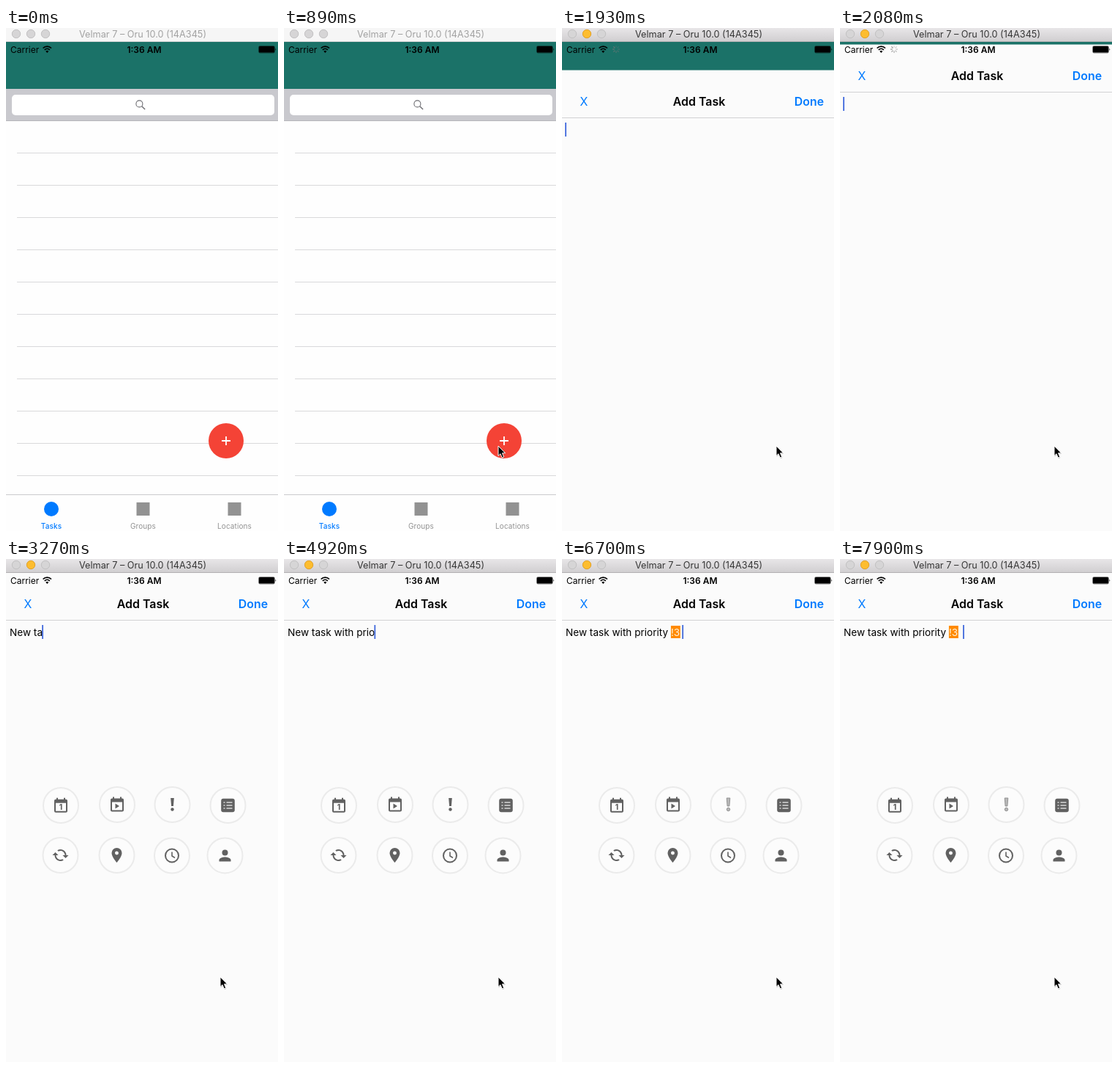
Recreate the animation shown at these times as an HTML page. Size 372 by 686 pixels, loop 8 s.

```html
<!DOCTYPE html>
<html lang="en">
<head>
<meta charset="utf-8">
<title>Add Task</title>
<style>
  html, body { margin: 0; width: 100%; height: 100%; overflow: hidden; background: #fff; }
  svg { display: block; width: 372px; height: 686px; font-family: Inter, Roboto, sans-serif; }
  .mid { text-anchor: middle; }
  .nav { font-size: 15.9px; }
  .bold { font-weight: 600; }
  .entry { font-size: 13.6px; white-space: pre; }
  .tab { font-size: 10px; letter-spacing: .1px; }
</style>
</head>
<body>
<svg viewBox="0 0 372 686">
  <defs>
    <linearGradient id="chrome" x2="0" y2="1">
      <stop stop-color="#e8e6e8"/><stop offset="1" stop-color="#d0ced0"/>
    </linearGradient>
  </defs>

  <g id="list">
    <rect width="372" height="686" fill="#fefefe"/>
    <rect y="18" width="372" height="65" fill="#1b7268"/>
    <rect y="83" width="372" height="44" fill="#c9c9ce"/>
    <path d="M0 126.5H372" stroke="#b6b6bb"/>
    <rect x="8" y="91" width="359" height="28" rx="5" fill="#fff"/>
    <g fill="none" stroke="#6d6d72" stroke-width="1.1">
      <circle cx="182.4" cy="103.4" r="4.5"/><path d="M185.7 106.7l4.4 4.4" stroke-width="1.4"/>
    </g>
    <path id="rows" stroke="#d9d9db"/>
    <circle id="fab" cx="301" cy="563" r="24"/>
    <path id="plus" d="M295 563h12M301 557v12" stroke-width="1.8"/>
    <rect y="636" width="372" height="50" fill="#fefefe"/>
    <path d="M0 636.5H372" stroke="#cbcbcd"/>
    <circle cx="62" cy="656" r="10" fill="#007aff"/>
    <path d="M178.5 647h18v18h-18zM303.5 647h18v18h-18z" fill="#929292"/>
    <g class="tab mid" fill="#929292">
      <text x="62" y="682.5" fill="#007aff" font-weight="500">Tasks</text>
      <text x="187.5" y="682.5">Groups</text>
      <text x="312.5" y="682.5">Locations</text>
    </g>
  </g>

  <g id="sheet">
    <rect y="18.5" width="372" height="668" fill="#fbfbfb"/>
    <path d="M0 83.5H372" stroke="#d2d2d4"/>
    <g class="nav mid">
      <text x="30" y="67" fill="#007aff">X</text>
      <text x="187.5" y="67" class="bold">Add Task</text>
      <text x="338" y="67" class="bold" fill="#007aff">Done</text>
    </g>
    <rect id="patch" x="96" y="90" width="69" height="42" fill="#fff"/>
    <text id="entry" class="entry" x="5" y="104.5"></text>
    <g id="tag">
      <rect id="tagBox" y="91" height="17" fill="#ff8a00"/>
      <text id="tagText" class="entry" y="104.5" fill="#fff3e0">!3</text>
    </g>
    <rect id="caret" y="90" width="1.8" height="19" fill="#4169dc"/>
    <g id="icons"></g>
    <path id="choices" stroke="#d9d9db"/>
  </g>

  <g id="status">
    <text x="6" y="33.5" font-size="12">Carrier</text>
    <text x="189" y="33.5" font-size="12" class="mid bold">1:36 AM</text>
    <path d="M50.6 27.5a8 8 0 0 1 11.4 0M52.8 29.9a5 5 0 0 1 7 0" fill="none" stroke="#000" stroke-width="1.7"/>
    <path d="M54.3 31.7a3 3 0 0 1 4 0l-2 2.2z"/>
    <rect x="345.5" y="24.5" width="22" height="9.5" rx="2" fill="none" stroke="#000" stroke-opacity=".45"/>
    <rect x="346" y="25" width="21" height="8.5" rx="1"/>
    <path d="M368.5 27.600q1.600 1.600 0 3.300z"/>
    <g id="spinner" stroke="#777" stroke-width="1.1"></g>
  </g>

  <g id="titleBar">
    <rect id="bar" width="372" height="18.5"/>
    <path id="barEdge" d="M0 18.5H372"/>
    <g id="lights"></g>
    <text id="caption" class="mid" x="187" y="13" font-size="12.7">Velmar 7 – Oru 10.0 (14A345)</text>
  </g>

  <g id="pointer">
    <path d="M0 0V13.5L3 10.7 5.3 16 7.7 15 5.5 9.8H9.7Z" transform="translate(.6 1.2)" opacity=".2"/>
    <path d="M0 0V13.5L3 10.7 5.3 16 7.7 15 5.5 9.8H9.7Z" stroke="#fff"/>
  </g>
</svg>
<script>
const LOOP = 8000, STEP = 148.4;
const MESSAGE = 'New task with priority !3  ', TAG_START = 23;

// [time, visible characters]
const TYPING = [
  [2820, 1], [2970, 2], [3120, 4], [3270, 6], [3420, 7], [3570, 9],
  [4020, 10], [4170, 11], [4320, 12], [4470, 14], [4620, 15], [4770, 16],
  [4920, 18], [5060, 19], [5210, 20], [5360, 21], [5510, 22], [5660, 23],
  [6110, 24], [6700, 26], [6850, 27]
];
// [time, caret opacity]
const BLINK = [[2380, .4], [2520, 0], [2820, 1], [7450, .4], [7600, 0], [7900, 1]];

const $ = id => document.getElementById(id);
const set = (id, attrs) => {
  for (const name in attrs) $(id).setAttribute(name, attrs[name]);
};
const show = (id, on) => { $(id).style.display = on ? '' : 'none'; };
const during = (t, from, to) => t >= from && t < to;
const valueAt = (track, t, start) => track.reduce((v, [time, next]) => t >= time ? next : v, start);

const lines = (first, count) =>
  Array.from({ length: count }, (_, i) => `M15 ${first + 44 * i}H372`).join('');

const CALENDAR = '<path d="M19 3h-1V1h-2v2H8V1H6v2H5C3.9 3 3 3.9 3 5v14a2 2 0 0 0 2 2h14c1.1 0 2-.9 2-2V5c0-1.1-.9-2-2-2zm0 16H5V8h14z"/>';
// [circle x, circle y, glyph on a 24 unit grid]
const ICONS = [
  [75, 336, `<g transform="translate(0 .8)">${CALENDAR}<text class="mid" x="12" y="17.2" font-size="10" font-weight="800">1</text></g>`],
  [152, 335, `<g transform="translate(0 .6)">${CALENDAR}<path d="M9.5 10v7l5.5-3.5z"/></g>`],
  [227.5, 335, '<g id="bang"><path d="M9.7 3h4.6l-.9 11h-2.8z"/><circle cx="12" cy="18.5" r="2.2"/></g>'],
  [303.5, 336, '<rect x="2.7" y="2.7" width="18.6" height="18.6" rx="3"/><path d="M6 8h2m2 0h8M6 12h2m2 0h8M6 16h2m2 0h8" stroke="#d8d8d8" stroke-width="1.3"/>'],
  [74.5, 404, '<path transform="matrix(-1 0 0 1 24 0)" d="M19 8l-4 4h3c0 3.3-2.7 6-6 6-1 0-2-.25-2.8-.7l-1.46 1.46A8 8 0 0 0 20 12h3zM6 12c0-3.3 2.7-6 6-6 1 0 2 .25 2.8.7l1.46-1.46A8 8 0 0 0 4 12H1l4 4 4-4z"/>'],
  [151.5, 404, '<path d="M12 2a7 7 0 0 0-7 7c0 5.25 7 13 7 13s7-7.75 7-13a7 7 0 0 0-7-7zm0 9.5a2.5 2.5 0 0 1 0-5 2.5 2.5 0 0 1 0 5z"/>'],
  [227, 404.5, '<g fill="none" stroke="#616161"><circle cx="12" cy="12" r="9" stroke-width="2"/><path d="M12 7v5.5l4 2.5" stroke-width="1.6"/></g>'],
  [299.5, 404.4, '<circle cx="12" cy="8" r="4"/><path d="M12 14c-2.7 0-8 1.3-8 4v2h16v-2c0-2.7-5.3-4-8-4z"/>']
];

$('icons').innerHTML = ICONS.map(([x, y, glyph]) =>
  `<circle cx="${x}" cy="${y}" r="24" fill="#fcfcfc" stroke="#ebebeb" stroke-width="2"/>
   <g transform="translate(${x - 12} ${y - 12})" fill="#616161">${glyph}</g>`).join('');
$('lights').innerHTML = [14, 34, 54].map((x, i) =>
  `<circle id="light${i}" cx="${x}" cy="8" r="5.7"/>`).join('');
$('spinner').innerHTML = Array.from({ length: 8 }, (_, i) =>
  `<path d="M74 26.8v-2.8" transform="rotate(${45 * i} 74 29)" opacity="${.3 + i * .09}"/>`).join('');
set('rows', { d: lines(170.5, 11) });
set('choices', { d: lines(172.5, 6) });

const pen = document.createElement('canvas').getContext('2d');
const widthOf = text => {
  pen.font = '13.6px Inter, Roboto, sans-serif';
  return pen.measureText(text).width;
};

function drawTitleBar(active) {
  set('bar', { fill: active ? 'url(#chrome)' : '#f6f6f6' });
  set('barEdge', { stroke: active ? '#b2b0b2' : '#d4d4d4' });
  set('caption', { fill: active ? '#363636' : '#a2a2a2' });
  for (const i of [0, 1, 2]) {
    const lit = active && i === 1;
    set('light' + i, { fill: lit ? '#fdbd2f' : '#d6d5d6', stroke: lit ? '#e0a12a' : '#c2c1c2' });
  }
}

function drawEntry(t) {
  const count = valueAt(TYPING, t, 0);
  const tagged = count >= 26;
  const tagX = 5 + widthOf(MESSAGE.slice(0, TAG_START));
  $('entry').textContent = MESSAGE.slice(0, tagged ? TAG_START : count);
  show('tag', tagged);
  set('tagBox', { x: tagX, width: widthOf('!3') + .6 });
  set('tagText', { x: tagX });
  set('caret', { x: 4.2 + widthOf(MESSAGE.slice(0, count)), opacity: valueAt(BLINK, t, 1) });
  set('bang', tagged
    ? { fill: '#b8b8b8', stroke: '#8c8c8c', 'stroke-width': .9 }
    : { fill: '#616161', stroke: 'none', 'stroke-width': 0 });
}

function draw(t) {
  const tick = Math.floor((t + 9) / STEP) * STEP;

  drawTitleBar(t >= 1190);

  const pressed = during(t, 1340, 1630);
  set('fab', { fill: pressed ? '#82241e' : '#f44336' });
  set('plus', { stroke: pressed ? '#8a8583' : '#fff' });

  // Critically damped spring brings the sheet up.
  const spring = 18.26 * Math.max(0, tick - 1680) / 1000;
  const offset = Math.round(667 * (1 + spring) * Math.exp(-spring));
  set('sheet', { transform: `translate(0 ${offset})` });
  show('sheet', t >= 1700);
  show('spinner', during(t, 1780, 2230));

  const choosing = during(t, 6110, 6700);
  show('icons', t >= 2230 && !choosing);
  show('choices', choosing);
  show('patch', during(t, 5060, 6110));
  drawEntry(t);

  const left = (1 - Math.min(1, Math.max(0, (tick - 297) / 593))) ** 2;
  set('pointer', { transform: `translate(${293 + 71 * left} ${570 + 49 * left})` });
  show('pointer', t >= 300);
}

const start = performance.now();
function frame() {
  draw((performance.now() - start) % LOOP);
  requestAnimationFrame(frame);
}
frame();
</script>
</body>
</html>
```
